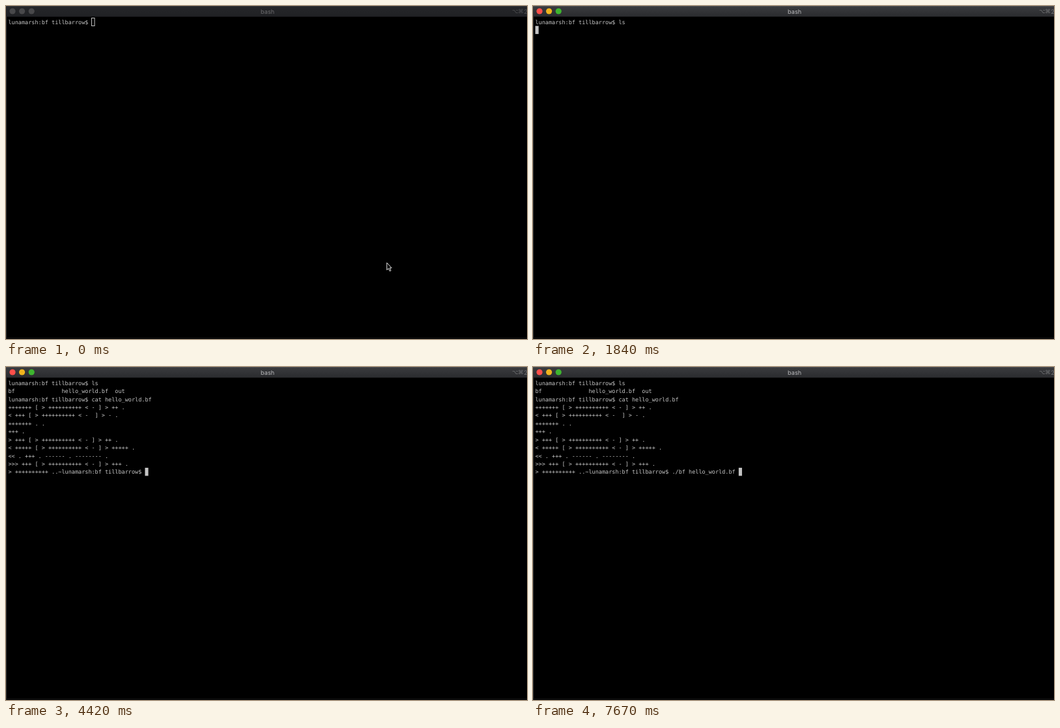
Write an HTML page with a canvas that moves like this. It is 800 by 512 pixels and loops after 8 s.

```html
<!DOCTYPE html>
<html lang="en">
<head>
<meta charset="utf-8">
<title>Terminal</title>
<style>
  html, body { margin: 0; width: 100%; height: 100%; overflow: hidden; background: #000; }
  canvas { display: block; width: 800px; height: 512px; }
</style>
</head>
<body>
<canvas id="stage" width="800" height="512"></canvas>
<script>
const ctx = document.getElementById('stage').getContext('2d');
ctx.textRendering = 'geometricPrecision';

const LOOP = 8000, FOCUS = 250, MOVED = 500, POINTER_GONE = 1500;
const COL = 5.12, ROW = 12.43, LEFT = 3.5, TOP = 18.2;
const MONO = '8.5px "DejaVu Sans Mono", monospace';
const PROMPT = 'lunamarsh:bf tillbarrow$ ';

const LISTING = 'bf'.padEnd(16) + 'hello_world.bf  out\n';
const PROGRAM = [
  '+++++++ [ > ++++++++++ < - ] > ++ .',
  '< +++ [ > ++++++++++ < -  ] > - .',
  '+++++++ . .',
  '+++ .',
  '> +++ [ > ++++++++++ < - ] > ++ .',
  '< +++++ [ > ++++++++++ < - ] > +++++ .',
  '<< . +++ . ------ . -------- .',
  '>>> +++ [ > ++++++++++ < - ] > +++ .',
  '> ++++++++++ ..~'
].join('\n');

// Time in ms and the text that is added to the screen then.
const output = [
  [0, PROMPT],
  [1590, 'l'], [1670, 's'],
  [1840, '\n'], [1920, LISTING + PROMPT],
  [2340, 'c'], [2420, 'a'], [2590, 't'], [2750, ' '], [2920, 'h'],
  [3340, 'ello_world.bf '],
  [4420, '\n' + PROGRAM + PROMPT],
  [6340, '.'], [6500, '/'], [6670, 'b'], [6750, 'f'], [6920, ' '],
  [7090, 'h'], [7420, 'e'], [7670, 'llo_world.bf ']
];

function rect(color, x, y, w, h) {
  ctx.fillStyle = color;
  ctx.fillRect(x, y, w, h);
}

function label(text, x, y, font, color) {
  ctx.font = font;
  ctx.fillStyle = color;
  ctx.fillText(text, x, y);
}

function drawTitleBar(active) {
  const shade = ctx.createLinearGradient(0, 0, 0, 16);
  shade.addColorStop(0, active ? '#3a3b3e' : '#26272a');
  shade.addColorStop(1, active ? '#2b2c2f' : '#202124');
  rect(shade, 0, 0, 800, 16);
  rect(active ? '#4b4c4f' : '#343538', 0, 0, 800, 1);
  rect('#111113', 0, 16, 800, 1);

  const lights = ['#ff4f4a', '#f0b41e', '#3eb52f'];
  lights.forEach((color, i) => {
    ctx.fillStyle = active ? color : '#48484a';
    ctx.beginPath();
    ctx.arc(10 + i * 14.6, 8, 4.6, 0, Math.PI * 2);
    ctx.fill();
  });

  ctx.textAlign = 'center';
  label('bash', 401.7, 11.6, '9.2px Inter, sans-serif', active ? '#bababc' : '#6c6c6e');
  const hint = active ? '#737476' : '#505153';
  label('⌥', 782, 11.4, '8.5px "DejaVu Sans", sans-serif', hint);
  label('⌘', 790.5, 11.4, '8.5px "DejaVu Sans", sans-serif', hint);
  label('2', 798, 11.6, '9.2px Inter, sans-serif', hint);
}

function drawScreen(t, active) {
  const lines = output.filter(([at]) => at <= t).map(([, text]) => text).join('').split('\n');
  ctx.textAlign = 'left';
  lines.forEach((line, row) => {
    [...line].forEach((char, col) => {
      if (char !== ' ') label(char, LEFT + col * COL, TOP + row * ROW + 9.5, MONO, '#c7c7c7');
    });
  });

  const row = lines.length - 1;
  const x = LEFT + lines[row].length * COL;
  const y = TOP + row * ROW;
  if (active) {
    rect('#c4c4c4', x, y, COL, ROW);
  } else {
    ctx.strokeStyle = '#c4c4c4';
    ctx.lineWidth = 1;
    ctx.strokeRect(131.5, 18.5, 4.5, 12);
  }
}

function drawPointer(t) {
  const p = Math.min(1, Math.max(0, (t - FOCUS) / (MOVED - FOCUS)));
  const ease = p * p * (3 - 2 * p);
  const shape = [[0, 0], [0, 11], [2.6, 8.7], [4.4, 12.8], [6.2, 12], [4.4, 8], [7.4, 8]];
  ctx.save();
  ctx.translate(584.8 + 112 * ease, 394.8 - 44 * ease);
  ctx.beginPath();
  shape.forEach(([x, y]) => ctx.lineTo(x, y));
  ctx.closePath();
  ctx.fillStyle = '#000';
  ctx.fill();
  ctx.strokeStyle = '#e6e6e6';
  ctx.lineWidth = 1;
  ctx.stroke();
  ctx.restore();
}

function draw(now) {
  const t = now % LOOP;
  const active = t >= FOCUS;
  rect('#000', 0, 0, 800, 512);
  drawTitleBar(active);
  rect('#333', 0, 16, 1, 496);
  rect('#161616', 0, 510, 800, 1);
  drawScreen(t, active);
  if (t < POINTER_GONE) drawPointer(t);
}

const start = performance.now();
function tick() {
  draw(performance.now() - start);
  requestAnimationFrame(tick);
}
tick();
</script>
</body>
</html>
```
